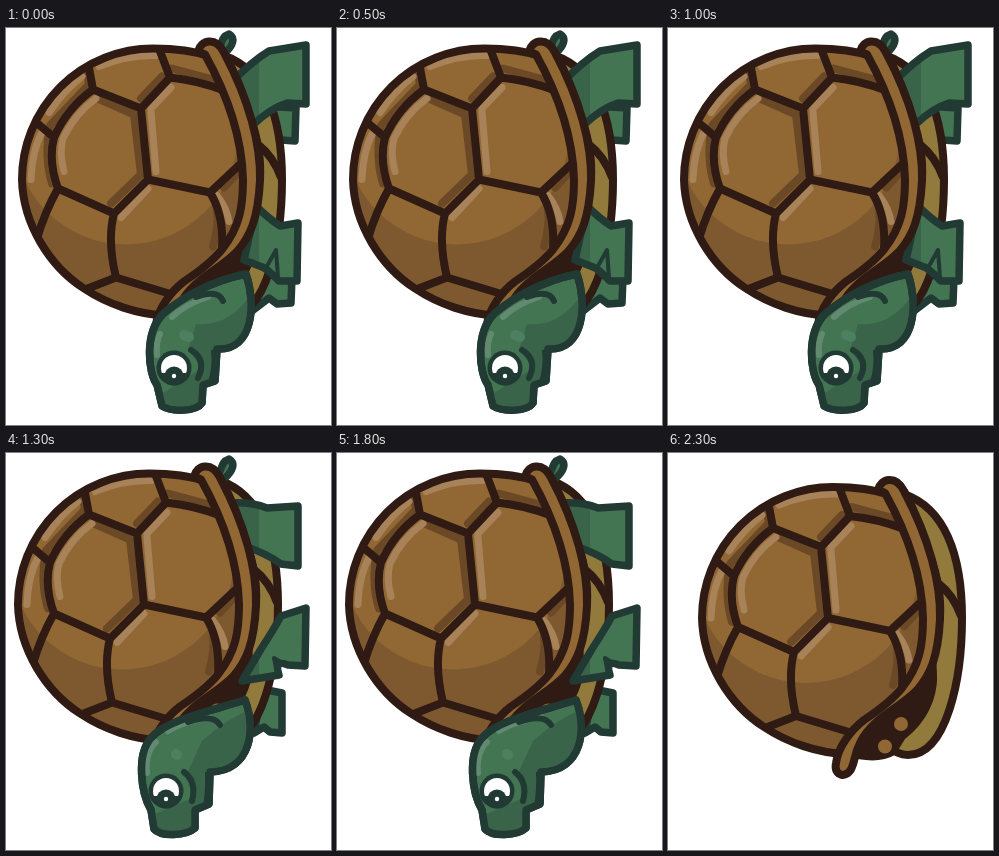
An HTML page for the animation above (7300 ms loop, 325x397 px).

```html
<!DOCTYPE html>
<html lang="en">
<head>
<meta charset="utf-8">
<title>Turtle</title>
<style>
  html, body { margin: 0; width: 100%; height: 100%; overflow: hidden; background: #fff; }
  svg { display: block; width: 325px; height: 397px; }
  path, circle { stroke-linecap: round; stroke-linejoin: round; }
  .skin { fill: #447553; stroke: #213a33; stroke-width: 7.5; }
  .leg { fill: url(#legShade); }
  .ink { fill: none; stroke: #213a33; stroke-width: 6; }
  .rim { fill: #916834; stroke: #301b14; stroke-width: 8; }
  .seam { fill: none; stroke: #301b14; stroke-width: 8; }
  .dim { fill: none; stroke: #6c4926; stroke-width: 8; }
  .shine { fill: none; stroke: #a88258; stroke-width: 7; }
</style>
</head>
<body>
<svg viewBox="0 0 325 397">
  <defs>
    <linearGradient id="legShade" gradientUnits="userSpaceOnUse" x1="235" y1="0" x2="295" y2="0">
      <stop offset=".3" stop-color="#3a6449"/>
      <stop offset=".3" stop-color="#447553"/>
    </linearGradient>
    <path id="dome" d="M222 42C205 36 185 34 165 34A131 131 0 0 0 34 165C35 210 62 252 96 274C120 290 150 300 178 301L245 235C265 180 258 100 222 42Z"/>
    <clipPath id="domeClip"><use href="#dome"/></clipPath>
    <clipPath id="headClip"><path data-part="head"/></clipPath>
  </defs>

  <g data-limb="hind"><path class="skin leg" data-part="hindFar"/></g>
  <g data-limb="front"><path class="skin leg" data-part="frontFar"/></g>

  <g class="shell">
    <path fill="#927a3c" stroke="#301b14" stroke-width="8" d="M236 41C276 55 294 100 294 165C294 225 279 302 240 302C225 302 215 290 220 270L262 160Z"/>
    <path class="seam" d="M270 130C279 137 288 149 293 163" stroke-width="7"/>
    <path fill="#301b14" d="M232 50C261 75 279 125 276 165C262 185 270 205 269 228C267 257 250 276 237 286L227 302C215 309 198 309 176 303L180 272Z"/>
    <circle cx="233" cy="271" r="7" fill="#916834"/>
    <circle cx="217" cy="293.500" r="7" fill="#916834"/>
  </g>

  <g data-limb="tail"><path class="skin" d="M211 22C217 17 214 9 223 6C230 10 227 18 218 26Z"/></g>
  <g data-limb="hind"><path class="skin leg" data-part="hindNear"/></g>
  <g data-limb="front">
    <path class="skin leg" data-part="frontNear"/>
    <path class="ink" data-part="claws" style="stroke-width:4"/>
  </g>

  <g class="shell">
    <g clip-path="url(#domeClip)">
      <use href="#dome" fill="#7e592f"/>
      <circle cx="138" cy="118" r="112" fill="#916834"/>
      <path class="dim" d="M98 51L101 70L62 111Q56 143 64 169M110 84L146 100L153 160L123 189M174 62L153 84M229 194Q231 212 225 232"/>
      <path class="dim" d="M184 54L236 68M250 158L236 173"/>
      <path class="shine" d="M43 165Q44 135 55 116M61 98Q76 76 94 62M111 52Q140 40 168 41M76 157Q71 138 75 124Q87 99 108 84M163 97L168 157M163 94L183 73M133 203L160 174M229 181Q239 194 241 207"/>
      <path class="seam" d="M100 48L105 75L153 94L182 63L171 34M182 63Q210 66 236 76M153 94L160 165L222 178L254 148M160 165L126 199L70 174Q60 146 66 123Q79 94 105 75M66 123L46 106M70 174Q57 197 49 224M126 199Q119 226 128 263L97 275M128 263L181 279M222 178Q236 200 234 234"/>
    </g>
    <use href="#dome" class="seam"/>
    <path class="rim" d="M210 37C213 25 228 22 236 38C261 85 273 130 272 166C270 205 262 222 249 237C232 255 204 265 192 290C186 302 187 308 184 314C180 326 165 324 168 310C170 294 183 277 196 267C214 255 226 245 234 235C252 212 255 192 255 165C254 125 242 85 217 40Z"/>
  </g>

  <g data-limb="head">
    <path class="skin" data-part="head"/>
    <g clip-path="url(#headClip)">
      <path fill="#3a6449" data-part="shade"/>
      <path fill="none" stroke="#628a70" stroke-width="6" data-part="gloss"/>
    </g>
    <path fill="#213a33" data-part="mouth"/>
    <path class="ink" data-part="crease"/>
    <path class="ink" data-part="cheek"/>
    <path fill="none" stroke="#4c8060" stroke-width="10" data-part="spot"/>
    <path class="skin" data-part="head" style="fill:none"/>
    <g id="eye">
      <circle r="17.500" fill="#213a33"/>
      <circle r="13" fill="#fff"/>
      <path id="lid" fill="#213a33" d="M-15 5A16 16 0 0 0 15 5Z"/>
      <circle cy="8" r="9.500" fill="#213a33"/>
      <circle cy="8" r="2.200" fill="#fff"/>
    </g>
  </g>
</svg>

<script>
// Each part: legs back, legs forward, startled.
const parts = {
  hindFar: [
    'M258 78L290 80L289 113L275 112L262 94Z',
    'M250 66L275 70L273 100L264 98L250 90Z',
    'M262 84L276 92L285 121L277 124L260 106Z'],
  hindNear: [
    'M226 54Q245 34 263 23L300 17L300 76L281 75Q265 80 248 96Z',
    'M224 50Q246 49 261 55L292 53L292 113L275 111Q260 100 238 93Z',
    'M226 56Q246 48 264 38L288 27L297 84L277 85Q263 88 246 99Z'],
  frontFar: [
    'M254 246L286 249L285 275L271 276L263 270L246 283Z',
    'M256 236L276 240L276 280L264 279L258 274L248 280Z',
    'M248 252L262 253L277 258L263 308L250 301L238 292Z'],
  frontNear: [
    'M250 178Q262 190 274 198L292 195L291 253L273 253Q260 240 256 239L238 232Z',
    'M255 196Q268 176 275 163L300 155L299 213L282 212Q268 206 273 222L236 228Z',
    'M250 166Q259 180 272 186L293 186L281 243L264 237Q253 230 250 229L238 226Z'],
  claws: [
    'M261 238L270 222L272 250M271 235L272 250',
    'M270 216L268 205L278 211M268 206L274 210',
    'M250 225L251 218L256 228M263 221L264 232'],
  head: [
    'M240 246C250 275 248 323 211 321L209 353L197 357L196 375C190 384 165 384 156 378L151 357C142 345 138 305 157 286C175 270 205 253 240 246Z',
    'M239 247C250 275 246 318 204 319L203 351L189 357L189 375C180 383 155 384 148 376L145 357C135 340 130 302 145 285C160 267 205 258 239 247Z',
    'M240 246C247 275 235 312 183 318L183 358L166 356L166 374C155 383 130 384 124 376L120 356C110 335 106 305 122 292C145 275 200 262 240 246Z'],
  shade: [
    'M250 258Q226 300 190 296L182 322L196 340L157 365L155 390L250 390Z',
    'M250 254Q222 264 196 288L182 318L186 345L147 362L148 390L250 390Z',
    'M250 264Q215 280 184 298L160 318L164 342L158 358L166 364L250 390Z'],
  gloss: [
    'M151 327Q150 314 154 306M166 289Q180 276 202 269',
    'M141 320Q139 300 150 289M162 278Q176 269 204 264',
    'M117 318Q117 304 126 298M136 291Q156 280 192 272'],
  mouth: [
    'M205 322L211 321L209 353L202 354Q207 338 205 322Z',
    'M199 319L204 319L203 351L197 353Q200 336 199 319Z',
    'M156 319L185 315L187 360Q181 371 165 358Q160 338 156 319Z'],
  crease: [
    'M190 269Q212 261 217 273',
    'M182 269Q207 260 214 272',
    'M184 272Q207 263 214 273'],
  cheek: [
    'M185 322Q201 332 192 350',
    'M178 319Q191 329 186 348',
    'M167 310Q158 315 162 326'],
  spot: [
    'M178 307L183 309',
    'M170 301L171 302',
    'M146 305L147 306']
};
const offsets = ['-18 -13.5', '-22 -13.5', '-22 -13.5'];
const eyes = ['168 340', '160 338', '136 338'];
const pivots = { hind: [232, 70], front: [238, 212], head: [226, 255], tail: [205, 28] };
const walk = [0, .35, .7, 1, .5];

const all = selector => [...document.querySelectorAll(selector)];
const mix = (from, to, t) => {
  const ends = to.match(/-?\d+(\.\d+)?/g);
  let i = 0;
  return from.replace(/-?\d+(\.\d+)?/g, n => (+n + (ends[i++] - n) * t).toFixed(2));
};
const place = (el, value) => el.setAttribute('transform', `translate(${value})`);

function draw(step) {
  const tucked = step < 22 ? 0 : step < 23 ? .5 : 1;
  const startled = step < 19 ? 0 : step < 20 ? .5 : 1;
  const from = startled ? 1 : 0;
  const t = startled || walk[step % 5];
  const blend = poses => mix(poses[from], poses[from + 1], t);

  all('[data-part]').forEach(el => el.setAttribute('d', blend(parts[el.dataset.part])));
  all('.shell').forEach(el => place(el, mix(blend(offsets), '0 0', tucked)));
  place(eye, blend(eyes));
  lid.style.display = startled ? 'none' : '';
  all('[data-limb]').forEach(el => {
    const [x, y] = pivots[el.dataset.limb];
    el.style.display = tucked === 1 ? 'none' : '';
    el.setAttribute('transform', `translate(${x} ${y}) scale(${1 - tucked}) translate(${-x} ${-y})`);
  });
}

const eye = document.getElementById('eye');
const lid = document.getElementById('lid');
const start = performance.now();
let shown = -1;
function tick() {
  const step = Math.floor((performance.now() - start) % 7300 / 100);
  if (step !== shown) draw(shown = step);
  requestAnimationFrame(tick);
}
tick();
</script>
</body>
</html>
```
